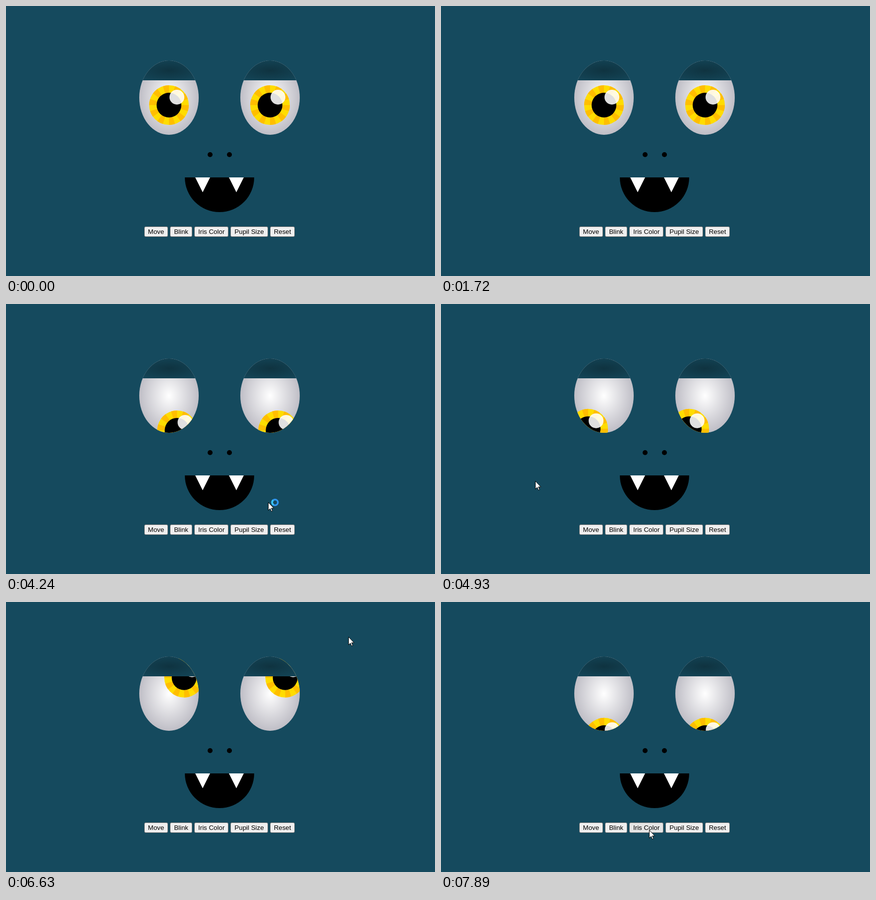
These frames come from a looping animation (866x545 px, 8000 ms). An HTML page:

```html
<!DOCTYPE html>
<html lang="en">
<head>
<meta charset="utf-8">
<title>Monster eyes</title>
<style>
  html, body { margin: 0; width: 100%; height: 100%; overflow: hidden; background: #154a5e; }
  svg { display: block; width: 866px; height: 545px; }
  text { font: 13.333px "Liberation Sans", Arial, sans-serif; }
</style>
</head>
<body>
<svg viewBox="0 0 866 545">
  <defs>
    <radialGradient id="ball">
      <stop offset="0" stop-color="#fff"/>
      <stop offset="1" stop-color="#bfbec6"/>
    </radialGradient>
    <radialGradient id="lid" gradientUnits="userSpaceOnUse" cx="0" cy="0" r="1"
      gradientTransform="translate(60 20) scale(84.9 28.3)">
      <stop offset="0" stop-color="#0f3340"/>
      <stop offset="1" stop-color="#14475a"/>
    </radialGradient>
    <clipPath id="edge"><ellipse cx="60" cy="75" rx="60" ry="75"/></clipPath>
    <g id="iris">
      <circle r="40" fill="#ffdc00"/>
      <circle r="20" fill="none" stroke="#ffbe00" stroke-width="40" pathLength="20"
        stroke-dasharray="1 1" stroke-dashoffset="1" transform="rotate(-90)"/>
      <circle r="25"/>
      <circle cx="16" cy="-16" r="15" fill="#fff" opacity=".88"/>
    </g>
  </defs>
  <rect width="866" height="545" fill="#154a5e"/>
  <g id="eyes"></g>
  <circle cx="412" cy="300" r="5"/>
  <circle cx="451" cy="300" r="5"/>
  <path d="M361 346H501A70 70 0 0 1 361 346Z"/>
  <path d="M382 346h30l-15 30zM450 346h30l-15 30z" fill="#fff"/>
  <g id="buttons"></g>
  <g id="cursor">
    <path d="M-.5 .5V16.6L3.2 13.1 5.6 18.7 8 17.7 5.6 12.2H10.6Z" fill="#fff" stroke="#000"/>
    <g id="busy" fill="none" stroke-width="3.6">
      <circle cx="13" cy=".5" r="5.8" stroke="#2f95f0"/>
      <path d="M10.1 5.5A5.8 5.8 0 0 1 9.3 -4" stroke="#38c3f6"/>
    </g>
  </g>
</svg>
<script>
const LOOP = 8000, STEPS = 8, LAG = 0.5;
const $ = id => document.getElementById(id);
const all = css => [...document.querySelectorAll(css)];

const blinks = [
  { start: 500, end: 1030, steps: 5 },
  { start: 1310, end: 1720, steps: 4 }
];

// Cursor sweeps, each along one cubic Bézier curve
const sweeps = [
  { start: 2430, end: 3390, busy: true, curve: [[95, 4], [260, 10], [370, 17], [679, 102]] },
  { start: 3540, end: 4510, busy: true, curve: [[686, 200], [680, 420], [554, 386], [420, 420]] },
  { start: 4660, end: 5650, curve: [[300, 421], [70, 430], [264, 79], [222, 90]] },
  { start: 5790, end: 6750, curve: [[260, 72], [330, 65], [656, 5], [742, 103]] },
  { start: 6870, end: 7890, curve: [[775, 150], [800, 330], [494, 454], [421, 460]] }
];

$("eyes").innerHTML = [269, 473].map(x => `
  <g transform="translate(${x} 110)">
    <ellipse cx="60" cy="75" rx="60" ry="75" fill="url(#ball)"/>
    <g clip-path="url(#edge)"><use href="#iris" class="iris"/></g>
    <g clip-path="url(#edge)"><rect class="lid" width="120" fill="url(#lid)"/></g>
  </g>`).join("");

$("buttons").innerHTML = ["Move", "Blink", "Iris Color", "Pupil Size", "Reset"].map(label => `
  <rect y="445.5" height="20" rx="2.5" stroke="#767676"/>
  <text y="460">${label}</text>`).join("");

const irises = all(".iris"), lids = all(".lid");
const faces = all("#buttons rect"), labels = all("#buttons text");
const buttons = layOut(labels.map(e => e.getComputedTextLength()));

// Centres the row and snaps each button to whole pixels
function layOut(widths) {
  const pad = 8, gap = 4;
  const total = widths.reduce((sum, w) => sum + w + 2 * pad + gap, -gap);
  let x = 431 - total / 2;
  return widths.map((w, i) => {
    const left = Math.round(x), right = Math.round(x + w + 2 * pad);
    faces[i].setAttribute("x", left + 0.5);
    faces[i].setAttribute("width", right - left - 1);
    labels[i].setAttribute("x", x + pad);
    x += w + 2 * pad + gap;
    return { left, right };
  });
}

// Number of the pose shown at time t, from 0 to steps - 1
function stepAt(t, { start, end }, steps) {
  const i = Math.floor((t - start) / (end - start) * (steps - 1) + 0.1);
  return Math.max(0, Math.min(steps - 1, i));
}

function bezier([a, b, c, d], u) {
  const v = 1 - u;
  return [0, 1].map(k =>
    v * v * v * a[k] + 3 * u * v * v * b[k] + 3 * u * u * v * c[k] + u * u * u * d[k]);
}

function lidAt(t) {
  const b = blinks.find(b => t >= b.start && t < b.end);
  return b ? 40 + 116 * Math.sin(Math.PI * (stepAt(t, b, b.steps) + 1) / b.steps) : 40;
}

function cursorAt(t) {
  const sweep = sweeps.findLast(s => t >= s.start);
  if (!sweep) return null;
  const i = stepAt(t, sweep, STEPS);
  const [x, y] = bezier(sweep.curve, i / (STEPS - 1));
  const seen = bezier(sweep.curve, Math.max(0, i - LAG) / (STEPS - 1));
  return { x: Math.round(x), y: Math.round(y), seen, busy: sweep.busy };
}

function draw(t) {
  const c = cursorAt(t), lid = lidAt(t);
  const [ix, iy] = c ? [c.seen[0] * 0.1375, 24.5 + c.seen[1] * 0.305] : [60, 90];
  irises.forEach(e => e.setAttribute("transform", `translate(${ix} ${iy})`));
  lids.forEach(e => e.setAttribute("height", lid));
  faces.forEach((e, i) => {
    const { left, right } = buttons[i];
    const over = c && c.x >= left && c.x < right && c.y >= 445 && c.y < 466;
    e.setAttribute("fill", over ? "#e5e5e5" : "#efefef");
  });
  $("cursor").style.display = c ? "" : "none";
  if (c) {
    $("cursor").setAttribute("transform", `translate(${c.x} ${c.y})`);
    $("busy").style.display = c.busy ? "" : "none";
  }
}

const began = performance.now();
function tick() {
  draw((performance.now() - began) % LOOP);
  requestAnimationFrame(tick);
}
tick();
</script>
</body>
</html>
```
